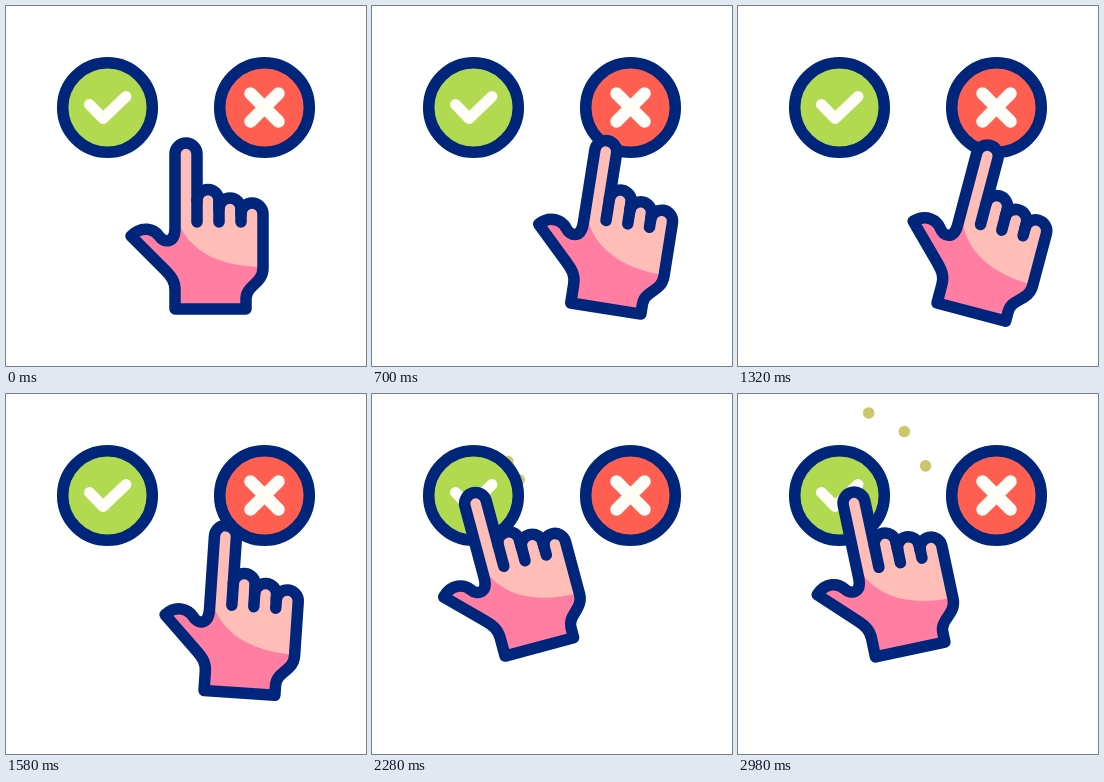
Animation, 360 px wide and 360 px high, one loop 3000 ms. Source, as an HTML page:

```html
<!DOCTYPE html>
<html lang="en">
<head>
<meta charset="utf-8">
<title>Choice</title>
<style>
  html, body { margin: 0; width: 100%; height: 100%; overflow: hidden; background: #fff; }
  svg { display: block; width: 100vw; height: 100vh; }
  .line { fill: none; stroke: #00267c; stroke-width: 11.5; stroke-linecap: round; stroke-linejoin: round; }
  .mark { fill: none; stroke: #fffdf8; stroke-linecap: round; stroke-linejoin: round; }
</style>
</head>
<body>
<svg viewBox="0 0 360 360">
  <defs>
    <path id="outline" d="M169 148 A11 11 0 0 1 191 148 V194.5 A11 11 0 0 1 213 194.5 V203
      A11 11 0 0 1 235 203 V208 A11 11 0 0 1 257 208 V262 C257 278 240 279 240 293 V303 H169 V284
      C169 275 165 270 159 264 L125 230 C136 219 148 223 153 230 C158 237 169 238 169 222 Z"/>
    <clipPath id="inside"><use href="#outline"/></clipPath>
  </defs>
  <g id="dots" fill="#cbc76c"></g>
  <g stroke="#00267c" stroke-width="11.5">
    <circle cx="101.5" cy="101.5" r="44.8" fill="#b1da50"/>
    <circle cx="258.5" cy="101.5" r="44.8" fill="#ff5f50"/>
  </g>
  <path class="mark" stroke-width="11" d="M83.5 98.5 L97 112.5 L120 90.5"/>
  <path class="mark" stroke-width="12.5" d="M244.5 87.5 l28 28 m0 -28 l-28 28"/>
  <g id="hand">
    <use href="#outline" fill="#ffbdb8"/>
    <path clip-path="url(#inside)" fill="#ff7ea2"
      d="M110 200 H172 V216 C182 241 208 262 262 261 V310 H110 Z"/>
    <use href="#outline" class="line"/>
    <path class="line" d="M191 194 V216 M213 194 V216 M235 203 V216"/>
  </g>
</svg>
<script>
  const LOOP = 3000;
  const WRIST = { x: 169, y: 303 };
  const BUTTON = { x: 101.5, y: 101.5 };

  // time, wrist x, wrist y, tilt in degrees
  const poses = [
    [0, 169, 303, 0],
    [590, 199, 297, 15.5],
    [800, 198.5, 297, 3.5],
    [985, 199, 297, 20],
    [1195, 199, 297, 4],
    [1400, 199, 297, 20],
    [1600, 198, 296.5, 3.5],
    [1960, 173, 306.5, -10.5],
    [2290, 133, 262, -15],
    [3000, 137.5, 263, -12]
  ];

  // direction in degrees, extra distance
  const rays = [[-70.5, -3.5], [-44.6, 0], [-19, 0]];

  const hand = document.getElementById("hand");
  const dots = rays.map(() => {
    const dot = document.createElementNS("http://www.w3.org/2000/svg", "circle");
    dot.setAttribute("r", 5.8);
    return document.getElementById("dots").appendChild(dot);
  });

  const ease = u => (1 - Math.cos(Math.PI * u)) / 2;

  function poseAt(t) {
    const next = poses.findIndex(p => p[0] > t);
    const a = poses[next - 1], b = poses[next];
    const k = ease((t - a[0]) / (b[0] - a[0]));
    return a.map((v, i) => v + (b[i] - v) * k).slice(1);
  }

  function draw(t) {
    const [x, y, tilt] = poseAt(t);
    hand.setAttribute("transform",
      `translate(${x} ${y}) rotate(${tilt}) translate(${-WRIST.x} ${-WRIST.y})`);

    // the dots fly out from behind the green button
    const reach = 91 - 0.061 * (2980 - t);
    dots.forEach((dot, i) => {
      const [deg, extra] = rays[i];
      const angle = deg * Math.PI / 180;
      dot.setAttribute("cx", BUTTON.x + (reach + extra) * Math.cos(angle));
      dot.setAttribute("cy", BUTTON.y + (reach + extra) * Math.sin(angle));
      dot.setAttribute("visibility", reach > 38 ? "visible" : "hidden");
    });
  }

  const start = performance.now();
  function frame(now) {
    draw(Math.max(0, now - start) % LOOP);
    requestAnimationFrame(frame);
  }
  draw(0);
  requestAnimationFrame(frame);
</script>
</body>
</html>
```
